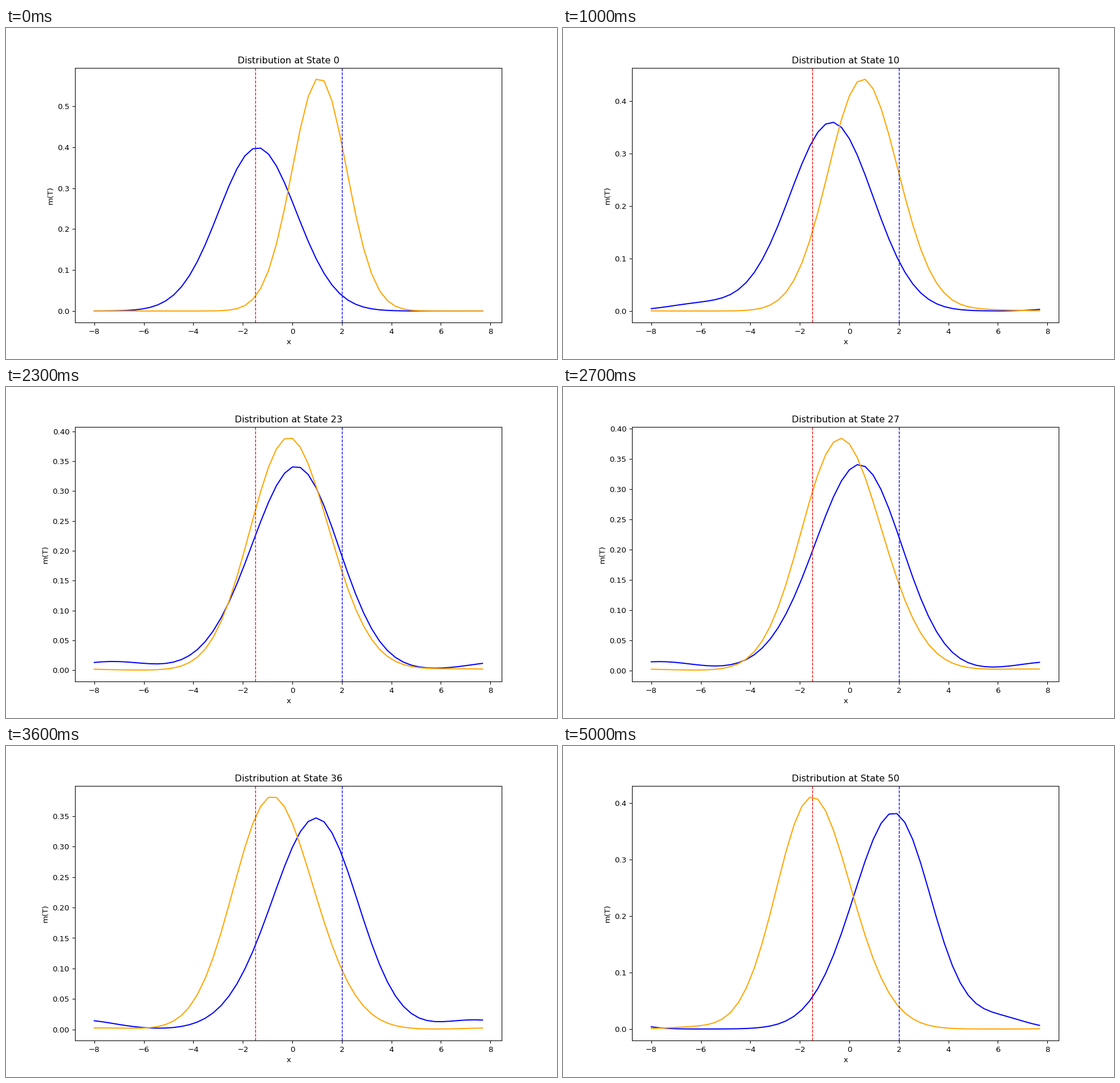
These frames come from a looping animation (966 by 580 pixels, 5100 ms). A matplotlib script:

```python
import numpy as np
import matplotlib.pyplot as plt
from matplotlib.animation import FuncAnimation

FRAMES, INTERVAL = 51, 100
DPI = 96.6
X = np.linspace(-8, 8, 50, endpoint=False)
PERIOD = 16
MASS = np.pi / 2

# Polynomials in the progress u from 0 to 1, lowest power first.
# "variance" sets the height and width of the hump; "leak" is the mass
# that splits off and drifts backwards around the periodic domain.
BLUE = dict(mean=(-1.41, 3.5, -0.32), variance=(6.281, 8.95, -8.763, 0.354),
            leak=0.056, drift=(-5, -5), direction=1)
ORANGE = dict(mean=(1.095, -2.75, 0.17), variance=(3.078, 12.245, -10.658, 1.25),
              leak=0.0095, drift=(4.2, 5.6), direction=-1)


def poly(coeffs, u):
    return sum(c * u ** k for k, c in enumerate(coeffs))


def leaked(u, leak, drift):
    """Small Gaussian bump wrapped around the domain, and its mass."""
    mass = leak * (1 - np.exp(-u / 0.12))
    spread = 1.1 + 0.4 * np.sin(np.pi * u)
    d = (X - poly(drift, u) + PERIOD / 2) % PERIOD - PERIOD / 2
    bump = np.exp(-0.5 * (d / spread) ** 2) / (spread * np.sqrt(2 * np.pi))
    return mass * bump, mass


def density(u, mean, variance, leak, drift, direction):
    bump, bump_mass = leaked(u, leak, drift)
    scale = np.sqrt(poly(variance, u))
    width = (MASS - bump_mass) * scale / np.sqrt(2 * np.pi)

    # The hump is steeper on the side it moves towards.
    d = (X - poly(mean, u)) * direction
    skew = np.tanh(2.5 * u)
    width = width * np.where(d > 0, 1 - 0.042 * u, 1 + 0.024 * u)
    power = 2 + skew * np.where(d > 0, 0.04, -0.09)
    hump = np.exp(-0.5 * (np.abs(d) / width) ** power) / scale
    return hump + bump


# The hundredth of a pixel guards against rounding down.
fig, ax = plt.subplots(figsize=(966.01 / DPI, 580.01 / DPI), dpi=DPI)
blue_line, = ax.plot(X, density(0, **BLUE), color="blue")
orange_line, = ax.plot(X, density(0, **ORANGE), color="orange")
ax.axvline(-1.5, color="red", linestyle="--", linewidth=1)
ax.axvline(2.0, color="blue", linestyle="--", linewidth=1)
ax.set_xlim(X[0] - 0.05 * np.ptp(X), X[-1] + 0.05 * np.ptp(X))
ax.set_xlabel("x")
ax.set_ylabel("m(T)")
title = ax.set_title("Distribution at State 0")


def update(state):
    u = state / (FRAMES - 1)
    curves = np.array([density(u, **BLUE), density(u, **ORANGE)])
    blue_line.set_ydata(curves[0])
    orange_line.set_ydata(curves[1])
    pad = 0.05 * np.ptp(curves)
    ax.set_ylim(curves.min() - pad, curves.max() + pad)
    title.set_text(f"Distribution at State {state}")
    return blue_line, orange_line, title


anim = FuncAnimation(fig, update, frames=FRAMES, interval=INTERVAL,
                     repeat=True, repeat_delay=0, blit=False)
plt.show()
```
